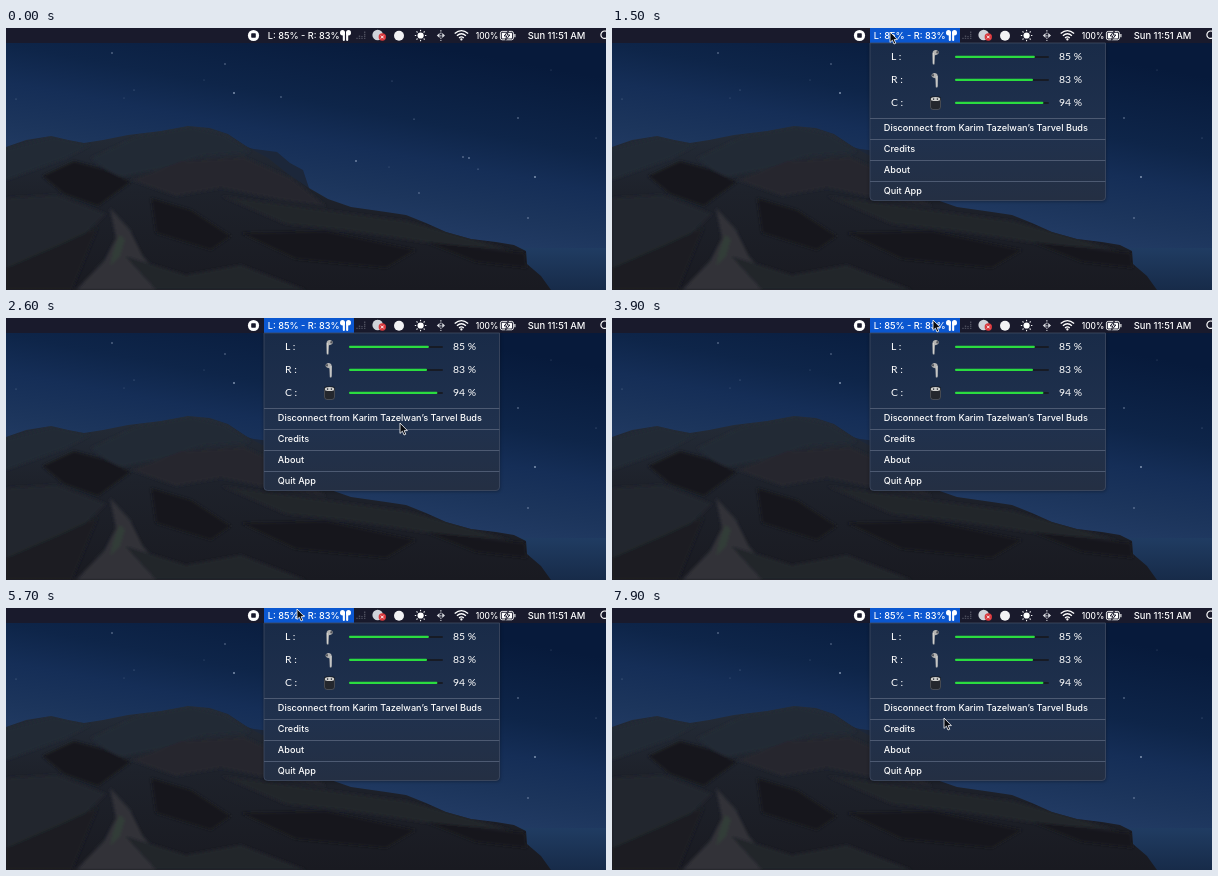
An HTML page for the animation above (8000 ms loop, 600 by 262 pixels).

```html
<!DOCTYPE html>
<html lang="en">
<head>
<meta charset="utf-8">
<title>Menu bar battery</title>
<style>
  html, body { margin: 0; width: 100%; height: 100%; overflow: hidden; background: #0a1d3f; }
  svg { display: block; width: 100%; height: 100%; }
  text { fill: #fff; font-family: Inter, "Noto Sans", sans-serif; font-weight: 500; }
  .bar { font-size: 9.4px; }
  .item { font-size: 9.15px; }
  .level { font: 400 10.4px Lato, "Open Sans", sans-serif; }
</style>
</head>
<body>
<svg viewBox="0 0 600 262" preserveAspectRatio="none">
  <defs>
    <linearGradient id="sky" gradientUnits="userSpaceOnUse" x1="330" y1="0" x2="290" y2="215">
      <stop offset="0" stop-color="#071a3b"/>
      <stop offset=".35" stop-color="#0e2549"/>
      <stop offset=".52" stop-color="#152e57"/>
      <stop offset=".7" stop-color="#1c355c"/>
      <stop offset=".88" stop-color="#233c65"/>
    </linearGradient>
    <linearGradient id="sea" x2="0" y2="1">
      <stop offset="0" stop-color="#203c62"/>
      <stop offset="1" stop-color="#172b49"/>
    </linearGradient>
    <linearGradient id="rock" x2="0" y2="1">
      <stop offset="0" stop-color="#242c38"/>
      <stop offset=".4" stop-color="#1e222b"/>
      <stop offset="1" stop-color="#191a21"/>
    </linearGradient>
    <linearGradient id="panel" x2="0" y2="1">
      <stop offset="0" stop-color="#192b48"/>
      <stop offset=".6" stop-color="#20314d"/>
      <stop offset="1" stop-color="#242f43"/>
    </linearGradient>
    <filter id="soft" x="-20%" y="-20%" width="140%" height="140%"><feGaussianBlur stdDeviation="1.8"/></filter>
    <path id="ridge" d="M0 119 20 112 45 108 62 112 78 115 97 112 122 107 155 103 182 98 204 100 222 106 240 118 262 130 282 146 303 160 322 171 345 179 380 184 400 187 420 195 440 204 465 211 490 214 508 217 520 223 521 236 535 248 545 262H0Z"/>
    <clipPath id="land"><use href="#ridge"/></clipPath>
    <g id="bud">
      <ellipse cx="2.5" cy="2.7" rx="2.5" ry="2.7"/>
      <rect x="2.8" y="1.4" width="2.1" height="9.6" rx="1"/>
    </g>
    <g id="pod">
      <path d="M1 3.2C1.2 .8 3.2 -.3 5.2 .2 7 .7 7.6 2 7 3.4 6.2 4.9 4.4 4.6 3.4 5.4L3 14.2Q2.2 15 1.3 14.2Z" fill="#b4b4b3"/>
      <path d="M1.8 3V13.6" stroke="#e2e1de" stroke-width=".8"/>
      <ellipse cx="5.8" cy="2.3" rx="1" ry="1.3" fill="#54565c"/>
    </g>
  </defs>

  <rect width="600" height="262" fill="url(#sky)"/>
  <g id="stars" fill="#cddcf2"></g>
  <rect x="500" y="220" width="100" height="42" fill="url(#sea)"/>
  <path d="M235 118 248 121 271 124 284 135 297 142 303 160 260 165Z" fill="#1c273a"/>
  <use href="#ridge" fill="url(#rock)"/>
  <g clip-path="url(#land)"><g filter="url(#soft)">
    <path d="M85 130 130 109 185 99 218 107 245 124 195 128 150 142 110 150Z" fill="#232a35"/>
    <path d="M0 121 48 109 84 117 60 130 0 152Z" fill="#202936"/>
    <path d="M36 148 68 133 98 141 125 154 92 178 58 166Z" fill="#14171e"/>
    <path d="M125 152 175 133 238 129 285 150 320 178 275 172 215 160 170 168Z" fill="#25282f"/>
    <path d="M145 170 185 182 225 208 205 222 150 205Z" fill="#16181e"/>
    <path d="M215 168 310 181 400 193 505 222 430 216 345 203 280 196Z" fill="#23252c"/>
    <path d="M235 205 320 203 410 222 380 240 290 231Z" fill="#16181e"/>
    <path d="M420 214 519 225 521 240 470 234Z" fill="#15181f"/>
    <path d="M0 170 50 167 100 186 62 222 0 240Z" fill="#23262d"/>
    <path d="M0 240 55 216 92 199 66 262H0Z" fill="#1a1d24"/>
    <path d="M104 180 124 202 136 227 165 262H70L98 233 110 210Z" fill="#303137"/>
    <path d="M119 228 180 247 235 237 300 262H150Z" fill="#24252c"/>
    <path d="M113 207 119 211 114 228 104 238 107 224Z" fill="#323c37"/>
  </g></g>

  <rect width="600" height="15" fill="#191a2c"/>
  <rect id="glow" x="258" width="90" height="15" fill="#0b57d0"/>
  <circle cx="247.5" cy="7.5" r="5.6" fill="#fff"/>
  <rect x="245.2" y="5.2" width="4.6" height="4.6" rx=".7" fill="#191a2c"/>
  <text class="bar" x="261.8" y="11" style="font-size: 9.2px">L: 85% - R: 83%</text>
  <g fill="#fff">
    <use href="#bud" x="334" y="2"/>
    <use href="#bud" transform="translate(345 2) scale(-1 1)"/>
  </g>
  <path d="M351 11V9M353.5 11V7M356 11V8M358.7 11V3" stroke="#4c4e5c" stroke-width="1.4" stroke-dasharray="1.3 .6"/>
  <circle cx="371.7" cy="7" r="5.3" fill="#cfd3d9"/>
  <circle cx="376.3" cy="9" r="3.7" fill="#d8383c"/>
  <path d="M374.9 7.6 377.7 10.4M377.7 7.6 374.9 10.4" stroke="#fff"/>
  <circle cx="393" cy="7.8" r="5" fill="#f2f2f4"/>
  <circle cx="414.6" cy="7.5" r="3.1" fill="#fff"/>
  <g id="rays" stroke="#fff" stroke-width="1.1" stroke-linecap="round"></g>
  <g fill="#d9dbe0">
    <path d="M433.6 5V10L430.8 7.5ZM436.2 5V10L439 7.5Z"/>
    <path d="M434.9 2V13" stroke="#d9dbe0" stroke-width="1" stroke-dasharray="1.6 .9"/>
  </g>
  <g fill="none" stroke="#fff" stroke-width="1.3">
    <path d="M448.7 5.6Q455.4 -.4 462.1 5.6M450.9 7.8Q455.4 3.8 459.9 7.8M453 9.9Q455.4 7.9 457.8 9.9"/>
    <circle cx="455.4" cy="11.4" r=".5"/>
  </g>
  <text x="469.8" y="10.7" font-size="8.3">100%</text>
  <rect x="494.4" y="3.4" width="13" height="8.4" rx="1.8" fill="none" stroke="#fff" stroke-width=".9"/>
  <rect x="495.8" y="4.8" width="10.2" height="5.6" rx=".6" fill="#fff"/>
  <path d="M502.4 2.8 498.2 8H500.7L499.4 12.4 503.8 7H501.2Z" fill="#fff" stroke="#191a2c" stroke-width="1"/>
  <path d="M508.9 6V9.2" stroke="#fff" stroke-width="1.1"/>
  <text class="bar" x="521.7" y="11">Sun 11:51 AM</text>
  <circle cx="598.6" cy="6.7" r="3.7" fill="none" stroke="#fff" stroke-width="1.2"/>

  <g id="menu">
    <path d="M257 16H494.5V170Q494.5 174 490.5 174H261Q257 174 257 170Z" fill="#000" opacity=".25" filter="url(#soft)"/>
    <path d="M258 15H493.5V169Q493.5 172.5 490 172.5H261.5Q258 172.5 258 169Z" fill="url(#panel)" stroke="#414c62" stroke-width=".8"/>
    <g id="rows"></g>
    <use href="#pod" x="319.5" y="22"/>
    <use href="#pod" transform="translate(326.8 45) scale(-1 1)"/>
    <rect x="318" y="68.5" width="11" height="13" rx="2.4" fill="#14171d"/>
    <path d="M318.5 72.5H328.5V79Q328.5 81.5 326 81.5H321Q318.5 81.5 318.5 79Z" fill="#24272d" stroke="#73777e" stroke-width=".5"/>
    <ellipse cx="323.5" cy="71" rx="4.8" ry="2" fill="#cfcfcd"/>
    <path d="M321.6 70.2V72M325.4 70.2V72" stroke="#484b51" stroke-width="1.2"/>
  </g>

  <path id="cursor" d="M0 0V10.4L2.4 8.2 4 12 5.8 11.2 4.2 7.6H7.4Z" fill="#080a10" stroke="#fff" stroke-width=".8" stroke-linejoin="round"/>
</svg>
<script>
const LOOP = 8000, STEP = 100;
const $ = id => document.getElementById(id);

function add(parent, tag, attrs, label) {
  const node = document.createElementNS("http://www.w3.org/2000/svg", tag);
  for (const key in attrs) node.setAttribute(key, attrs[key]);
  if (label) node.textContent = label;
  parent.append(node);
}

// x, y, brightness
const stars = [
  [228, 65, 1], [219, 36, .6], [106, 25, .7], [275, 69, .6], [350, 133, .9], [457, 129, .7],
  [463, 130, .8], [472, 141, .5], [529, 149, 1], [413, 165, .6], [522, 190, .7], [512, 90, .7],
  [408, 91, .5], [386, 53, .4], [128, 62, .4], [10, 71, .4], [118, 70, .3], [545, 42, .3],
  [198, 52, .3], [383, 139, .3], [590, 110, .4]
];
for (const [cx, cy, opacity] of stars) add($("stars"), "circle", { cx, cy, opacity, r: .45 + opacity * .35 });

for (let i = 0; i < 8; i++) {
  add($("rays"), "path", { d: "M0 -4.8V-5.3", transform: `translate(414.6 7.5) rotate(${i * 45})` });
}

[["L :", 85], ["R :", 83], ["C :", 94]].forEach(([name, level], i) => {
  const y = 29 + i * 23, rows = $("rows");
  add(rows, "text", { class: "level", x: 279, y: y + 3.2 }, name);
  add(rows, "rect", { x: 343, y: y - 1, width: 94, height: 2, rx: 1, fill: "#171b25" });
  add(rows, "rect", { x: 343, y: y - 1.2, width: 94 * level / 100, height: 2.2, rx: 1, fill: "#2bdc40" });
  add(rows, "text", { class: "level", x: 447, y: y + 3.4 }, level + " %");
});

["Disconnect from Karim Tazelwan’s Tarvel Buds", "Credits", "About", "Quit App"].forEach((label, i) => {
  const y = 90 + i * 21;
  add($("rows"), "path", { d: `M258 ${y + .5}H493.5`, stroke: "#4d5a72", "stroke-width": 1.2 });
  add($("rows"), "text", { class: "item", x: 271.8, y: y + 13.2 }, label);
});

// time, x, y of the pointer tip
const path = [
  [0, 330, 264], [400, 278, 5], [1500, 278, 4], [1800, 280, 5], [2600, 394, 105],
  [2900, 394, 105], [3600, 326, 6], [3900, 321, 2], [4500, 314, 3], [5000, 300, 0],
  [5700, 291, 1], [6300, 294, 3], [6500, 296, 4], [6700, 296.5, 4.5], [7500, 296.5, 4.5], [7900, 332, 110]
];

function pointer(t) {
  const i = path.findIndex(key => key[0] > t);
  if (i < 0) return path[path.length - 1].slice(1);
  const [t0, x0, y0] = path[i - 1], [t1, x1, y1] = path[i];
  const p = (t - t0) / (t1 - t0), e = p * p * (3 - 2 * p);
  return [x0 + (x1 - x0) * e, y0 + (y1 - y0) * e];
}

// Opens at once, fades out when closed
function menuAlpha(t) {
  if (t < 500) return 0;
  if (t < 6900 || t >= 7500) return 1;
  return Math.max(0, 1 - (t - 6800) / 300);
}

function draw(time) {
  const t = Math.floor(time % LOOP / STEP) * STEP;
  const alpha = menuAlpha(t);
  $("menu").setAttribute("opacity", alpha);
  $("glow").setAttribute("opacity", alpha === 1 ? 1 : 0);
  $("cursor").setAttribute("transform", `translate(${pointer(t)})`);
}

const start = performance.now();
function tick() {
  draw(performance.now() - start);
  requestAnimationFrame(tick);
}
tick();
</script>
</body>
</html>
```
